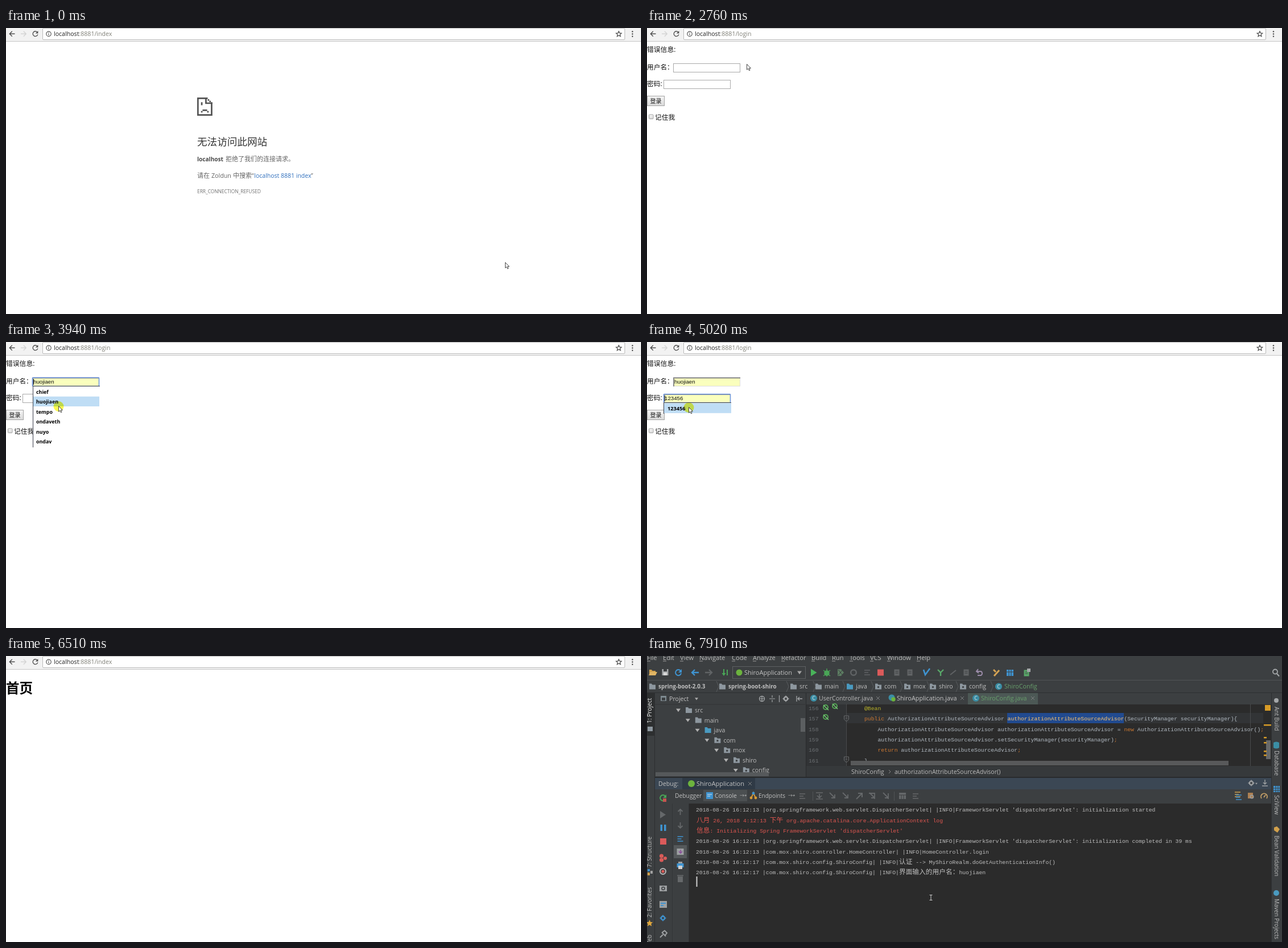
An HTML page for the animation above (7.99 s loop, 1116 by 502 pixels).

```html
<!DOCTYPE html>
<html lang="zh">
<head>
<meta charset="utf-8">
<title>Login demo</title>
<style>
html, body { margin: 0; width: 100%; height: 100%; overflow: hidden; background: #fff; }
svg { display: block; width: 1116px; height: 502px; font-family: "Open Sans", "Noto Sans CJK SC", "Noto Sans CJK", sans-serif; }
text { white-space: pre; }
.mono { font-family: "Liberation Mono", "Noto Sans CJK SC", monospace; }
.field { font-family: "Liberation Sans", sans-serif; }
.line { fill: none; }
#click { mix-blend-mode: multiply; }
</style>
</head>
<body>
<svg id="stage" viewBox="0 0 1116 502"></svg>
<script>
const LOOP = 7990;
const USERS = ['chief', 'huojiaen', 'tempo', 'ondaveth', 'nuyo', 'ondav'];
const CELL = 5.86;

const text = (x, y, s, size, fill, more = '') =>
  `<text x="${x}" y="${y}" font-size="${size}" fill="${fill}" ${more}>${s}</text>`;
const rect = (x, y, w, h, fill, more = '') =>
  `<rect x="${x}" y="${y}" width="${w}" height="${h}" fill="${fill}" ${more}/>`;
const line = (d, stroke, w = 1) =>
  `<path class="line" d="${d}" stroke="${stroke}" stroke-width="${w}"/>`;
const shape = (d, fill) => `<path d="${d}" fill="${fill}"/>`;
const dot = (x, y, r, fill) => `<circle cx="${x}" cy="${y}" r="${r}" fill="${fill}"/>`;
const ring = (x, y, r, stroke, w = 1) =>
  `<circle class="line" cx="${x}" cy="${y}" r="${r}" stroke="${stroke}" stroke-width="${w}"/>`;
const group = (id, body) => `<g id="${id}">${body}</g>`;

// Wide characters take two cells
const mono = (x, y, s, fill) => text(x, y,
  s.replace(/[\u3000-\u9fff\uff00-\uffef]+/g, m => `<tspan font-size="${CELL * 2}">${m}</tspan>`),
  CELL / 0.6, fill, 'class="mono"');

const paint = (s, pattern, fill) => s.replace(pattern, m => `<tspan fill="${fill}">${m}</tspan>`);

function browserBar() {
  const star = Array.from({ length: 10 }, (_, i) => {
    const a = i * Math.PI / 5, r = i % 2 ? 2.3 : 5;
    return `${(1077 + r * Math.sin(a)).toFixed(2)} ${(10.7 - r * Math.cos(a)).toFixed(2)}`;
  }).join('L');
  return rect(0, 0, 1116, 23, '#f2f2f2') + rect(0, 23, 1116, 1, '#c6c6c6') +
    rect(64.5, 0.5, 1023, 20, '#fff', 'rx="1.5" stroke="#b9b9b9"') +
    line('M15.5 10.3H6.5M10.8 5.8L6.3 10.3L10.8 14.8', '#505050', 1.4) +
    line('M26 10.3H35M30.8 5.8L35.3 10.3L30.8 14.8', '#d4d4d4', 1.4) +
    group('reload', line('M54.8 7.2A4.4 4.4 0 1 0 55.8 11.4', '#505050', 1.4) + shape('M56.4 5V9.6H51.8Z', '#505050')) +
    group('stop', line('M47.5 6.5L55.5 14.5M55.5 6.5L47.5 14.5', '#505050', 1.4)) +
    ring(75, 10.4, 4.2, '#555', 1.2) + rect(74.4, 9.7, 1.2, 3, '#555') + rect(74.4, 7.7, 1.2, 1.2, '#555') +
    `<text x="84" y="14" font-size="10.6" fill="#222">localhost<tspan fill="#808078">:8881/<tspan id="path"></tspan></tspan></text>` +
    group('urlCaret', rect(186, 3, 1, 13, '#222')) +
    line(`M${star}Z`, '#4a4a4a', 1.2) +
    [6.2, 10.5, 14.8].map(y => dot(1101, y, 1.2, '#505050')).join('');
}

function errorPage() {
  const gray = '#535353';
  const pixels = [[354.5, 125], [357.3, 127.7], [360, 130.3], [342.7, 145.7], [353.5, 145.7]];
  return line('M354.5 123.4H337.3V152.7H361.4V131M351.4 123V132H362.6', gray, 2.7) +
    pixels.map(([x, y]) => rect(x, y, 2.7, 2.7, gray)).join('') +
    rect(342.7, 130.3, 2.7, 5.2, gray) + rect(345.4, 143, 8.1, 2.7, gray) +
    text(336, 206, '无法访问此网站', 17.6, '#333') +
    text(336, 234, 'localhost', 10.1, '#4a4a4a', 'font-weight="700"') +
    text(386, 234, '拒绝了我们的连接请求。', 11, '#646464') +
    text(336, 263, '请在', 11, '#646464') + text(361, 263, 'Zoldun', 10.7, '#646464') +
    text(399, 263, '中搜索', 11, '#646464') + text(432, 263, '“', 10.5, '#646464') +
    text(436.3, 263, 'localhost 8881 index', 10.5, '#2f6fbd') + text(536, 263, '”', 10.5, '#646464') +
    text(336, 290.3, 'ERR_CONNECTION_REFUSED', 8.35, '#707070');
}

function field(id, x, y) {
  return group(id + 'Plain', rect(x + .5, y + .5, 117, 15, '#fff', 'stroke="#a9a9a9"')) +
    group(id + 'Fill', rect(x, y, 118, 16, '#faffbd') +
      line(`M${x} ${y + 15.5}H${x + 117.5}V${y}`, '#dedede') +
      line(`M${x + 1} ${y + 16}V${y + 1}H${x + 118}`, '#8b8b8b', 2)) +
    group(id + 'Focus', rect(x + .5, y + .5, 117, 15, 'none', 'stroke="#6f97de" stroke-width="1.6" rx="1"') +
      rect(x + 2, y + 3, 1, 10, '#222')) +
    text(x + 2, y + 11, '', 9.7, '#111', `id="${id}Text" class="field"`);
}

function loginPage() {
  const ink = '#111';
  const bold = 'font-weight="700"';
  return text(0, 42, '错误信息:', 11.8, ink) + text(0, 73, '用户名：', 11.7, ink) +
    text(0, 102, '密码:', 11.7, ink) + field('user', 46, 62) + field('pass', 29, 91) +
    rect(.5, 119.5, 30, 17, 'url(#button)', 'stroke="#a3a3a3"') + text(5.5, 132, '登录', 10, ink) +
    rect(3.5, 152, 7.5, 7.5, 'url(#button)', 'stroke="#a3a3a3" rx="1"') + text(14, 160.5, '记住我', 11.7, ink) +
    group('userList', rect(47, 78, 118, 107, '#fff') + rect(48, 0, 116, 17.3, '#bfddf5', 'id="hover"') +
      line('M47.5 185V77.5H165', '#3a3f4c') +
      USERS.map((u, i) => text(53, 90.5 + 17.5 * i, u, 8.9, '#000', bold)).join('')) +
    group('passList', rect(30, 107, 118, 18, '#fff') + rect(30, 107.5, 118, 17.3, '#bfddf5', 'id="passHover"') +
      line('M29.5 126V106.5H148', '#3a3f4c') + text(36, 120, '123456', 9.2, '#000', bold));
}

const folder = (x, y, fill = '#8d979f') => shape(`M${x} ${y - 5}h4l1.5 2h5.5v8h-11z`, fill);
const arrowDown = (x, y, fill = '#a7a7a7', r = 4) => shape(`M${x - r} ${y - r * .6}h${r * 2}l${-r} ${r * 1.4}z`, fill);
const classIcon = (x, y) => dot(x, y, 6, '#3b8ea5') +
  text(x, y + 3.4, 'C', 9, '#e0e6e8', 'text-anchor="middle"');
const close = (x, y) => line(`M${x - 3} ${y - 3}l6 6m0 -6l-6 6`, '#7d7f80');
const gear = (x, y, c) => ring(x, y, 3.3, c, 2.2) + line(`M${x - 5.5} ${y}h11M${x} ${y - 5.5}v11`, c, 1.3) + dot(x, y, 1.7, '#3c3f41');
const rows = (x, y, c) => line(`M${x - 5} ${y - 4}h10m-10 4h7m-7 4h10`, c, 1.7);
const page = (x, y, c) => rect(x - 4.5, y - 5.5, 9, 11, c) + line(`M${x - 2.5} ${y - 2}h5m-5 3h5`, '#3c3f41');
const turn = (x, y, c) => line(`M${x + 4} ${y - 3}a5 5 0 1 0 1 4`, c, 2) + shape(`M${x + 6} ${y - 6}v6h-6z`, c);
const side = (x, y, s, angle, size = 10, fill = '#bdbdbd') =>
  `<text transform="translate(${x} ${y}) rotate(${angle})" font-size="${size}" fill="${fill}">${s}</text>`;

function toolbar() {
  const blue = '#3f94d1', green = '#4aa657', dim = '#606365', grey = '#a4a7a9';
  const menu = [[0, 'File'], [28, 'Edit'], [58, 'View'], [92, 'Navigate'], [149, 'Code'], [186, 'Analyze'], [236, 'Refactor'],
    [289, 'Build'], [325, 'Run'], [356, 'Tools'], [392, 'VCS'], [422, 'Window'], [474, 'Help']];
  const arrow = (x, c, s) => line(`M${x - 6 * s} 29H${x + 5 * s}M${x + s} 24L${x + 6 * s} 29L${x + s} 34`, c, 2.4);
  return menu.map(([x, s]) => text(x, 6.5, s, 11.1, '#bbb') + rect(x, 8.5, 6, 1, '#999')).join('') +
    folder(4, 29, '#d1a04c') + shape('M3 34l3-6h12l-3 6z', '#e0b565') +
    rect(26.5, 23, 11, 11, grey) + rect(29, 23, 6, 4, '#3c3f41') + rect(29, 29, 6, 5, '#d8d8d8') +
    turn(55, 29, blue) + arrow(85, blue, -1) + arrow(108, dim, 1) +
    line('M135 23v9M141 34v-10', green, 2) + shape('M131.5 30h7l-3.5 5z', green) +
    rect(150.5, 18.5, 128, 21, '#3c3f41', 'stroke="#5e6163"') + dot(162, 29, 5.5, '#6cb33e') +
    text(171, 33, 'ShiroApplication', 11, '#c4c4c4') + arrowDown(268, 29) +
    shape('M288 22.5v13l10.5-6.5z', '#49b45a') +
    dot(316, 30, 4.8, green) + line('M310 25l12 10m0-10l-12 10M316 22v14', green, 1.4) +
    shape('M335 23h6l5 6-5 6h-6z', '#5c7d62') + line('M336 24l8 10m0-10l-8 10', '#3c3f41') +
    ring(363, 29, 4.8, dim, 2.5) + rows(387, 29, dim) + rect(405, 23.5, 11, 11, '#db5a5a') +
    page(439, 29, dim) + page(462, 29, dim) + line('M486 24l3 9 8-11', blue, 2.6) +
    line('M511 24l5 5 5-5m-5 5v6', '#59a869', 2.4) + line('M533 33l10-8', dim, 2) + page(561, 29, dim) +
    line('M582 23l-3 4 4 3m-4-3h8a4 4 0 0 1 0 7h-6', '#9a8ba8', 2) +
    line('M610 35l9-10m-10-1l4 4', '#d3a253', 3) + rect(632, 24, 12, 11, blue) + line('M632 28h12m-8-4v11m4-11v11', '#3c3f41') +
    page(667, 30, '#59a869') + rect(668, 22, 6, 6, '#a4a7a9') +
    ring(1104, 27.5, 4, grey, 1.8) + line('M1107 31l4 4.5', grey, 2);
}

function navigation() {
  const crumbs = [[20, 'spring-boot-2.0.3', 1], [143, 'spring-boot-shiro', 1], [268, 'src'], [312, 'main'], [367, 'java'],
    [417, 'com'], [468, 'mox'], [513, 'shiro'], [566, 'config']];
  return rect(0, 42, 1116, 1, '#515456') +
    crumbs.map(([x, s, b], i) => folder(x - 16, 53.5, i == 4 ? '#4a9ac0' : '#8d979f') +
      (i > 4 ? dot(x - 10.5, 54.5, 1.7, '#3c3f41') : '') +
      text(x, 57.3, s, b ? 9.9 : 10.6, '#c0c0c0', b ? 'font-weight="700"' : '')).join('') +
    [122, 245, 292, 344, 394, 445, 492, 543, 604].map(x => line(`M${x} 44l4 9.5-4 9.5`, '#585b5d')).join('') +
    classIcon(618, 53.5) + text(628, 57.3, 'ShiroConfig', 10.7, '#68a06c') + rect(0, 64, 1116, 1, '#2d2f31');
}

function projectTree() {
  const names = ['src', 'main', 'java', 'com', 'mox', 'shiro', 'config'];
  return rect(14, 65, 265, 146, '#3c3f41') + rect(14, 84.5, 264, 1, '#323536') +
    rect(24, 70, 10, 9, '#7f8b91') + rect(26, 73, 6, 5, '#3c3f41') + text(39, 79.3, 'Project', 10.6, '#c4c4c4') + arrowDown(87, 75, '#aaa', 3) +
    ring(202, 75, 4.5, '#a4a7a9', 1.3) + line('M202 71v8m-4-4h8M215 75h10m-5-6v4m0 4v4M232.5 69v12', '#a4a7a9', 1.2) +
    gear(244, 75, '#a4a7a9') + line('M263 70v10m2-5h8m-5-3l-3 3 3 3', '#a4a7a9', 1.3) +
    names.map((s, i) => {
      const y = 95 + 17.55 * i, x = 55 + 16.8 * i;
      return arrowDown(x, y, '#b0b0b0') + folder(x + 13, y, i == 2 ? '#4a9ac0' : '#8d979f') +
        (i > 2 ? dot(x + 18.5, y + 1, 1.7, '#3c3f41') : '') + text(x + 29, y + 4, s, 10.6, '#bcbcbc');
    }).join('') + rect(270, 109, 8, 24, '#5c5f61') + rect(15, 204, 199, 7, '#56595b');
}

function editor() {
  const type = 'AuthorizationAttributeSourceAdvisor', name = 'a' + type.slice(1);
  const code = ['@Bean', `public ${type} ${name}(SecurityManager securityManager){`,
    `    ${type} ${name} = new ${type}();`, `    ${name}.setSecurityManager(securityManager);`, `    return ${name};`, '}'];
  const tint = s => paint(paint(paint(s, /\b(public|new|return)\b|;/g, '#cc7832'),
    /@Bean/, '#bbb529'), RegExp(name + '(?=\\()'), '#ffc66d');
  return rect(279, 65, 1, 147, '#292b2d') + rect(280, 65, 817, 19, '#3c3f41') + rect(564, 65, 123, 20, '#4c5855') +
    classIcon(293, 74) + text(302, 78, 'UserController.java', 10.6, '#bbb') + close(406, 74) +
    dot(430, 73, 5.5, '#3b8ea5') + dot(433, 76, 3.7, '#6cb33e') + text(439, 78, 'ShiroApplication.java', 10.8, '#c8c8c8') + close(554, 74) +
    classIcon(578, 74) + text(587, 78, 'ShiroConfig.java', 10.7, '#68a06c') + close(678, 74) +
    rect(280, 85, 817, 108, '#2b2b2b') + rect(280, 85, 71, 108, '#313335') + rect(351, 100, 732, 18, '#323436') +
    rect(633, 100, 205, 18, '#214a8f') + line('M350.5 84V193M1060.5 84V193', '#494b4d') +
    code.map((s, i) => mono(284, 95 + 18.3 * i, String(156 + i), '#6c7073') + mono(382, 95 + 18.3 * i, tint(s), '#b2bac2')).join('') +
    [[314, 90], [330, 88], [314, 107]].map(([x, y]) => ring(x, y, 4, '#52a552', 2) + line(`M${x - 4} ${y - 4}l9 9`, '#7bc47b', 1.5)).join('') +
    [105, 177].map(y => line(`M346.5 ${y}h8v6l-4 4-4-4zM348.5 ${y + 4}h4`, '#686b6d')).join('') +
    rect(358, 184, 664, 8, '#58595a') + rect(1086, 86, 10, 10, '#d79b27') +
    rect(1088, 148, 8, 33, '#67696a') + [120, 142, 151, 166, 173].map((y, i) => rect(1084, y, i ? 5 : 13, 2.5, '#d79b27')).join('') +
    rect(280, 193, 817, 19, '#36393b') + text(359, 206.7, 'ShiroConfig', 10.7, '#bbb') +
    line('M425 200l3 3-3 3', '#888') + text(435, 206.7, `${name}()`, 10.55, '#bbb');
}

function debugPane() {
  const dim = '#65686a', grey = '#9da0a2', blue = '#3f94d1';
  const log = '2018-08-26 16:12:1', spring = ' |org.springframework.web.servlet.DispatcherServlet| |INFO|FrameworkServlet \'dispatcherServlet\': initialization ';
  const own = s => ` |com.mox.shiro.${s}| |INFO|`;
  const lines = [log + 3 + spring + 'started', '八月 26, 2018 4:12:13 下午 org.apache.catalina.core.ApplicationContext log',
    "信息: Initializing Spring FrameworkServlet 'dispatcherServlet'", log + 3 + spring + 'completed in 39 ms',
    log + 3 + own('controller.HomeController') + 'HomeController.login',
    log + 7 + own('config.ShiroConfig') + '认证 --&gt; MyShiroRealm.doGetAuthenticationInfo()',
    log + 7 + own('config.ShiroConfig') + '界面输入的用户名：' + USERS[1]];
  const step = (x, d) => line(`M${x - 5} 240l9 9m0-6v6h-6${d}`, dim, 1.8);
  return rect(14, 212, 1083, 2, '#292b2d') + rect(14, 214, 1083, 20, '#3c3f41', 'id="header"') + rect(62, 214, 128, 20, '#303335', 'id="headerTab"') +
    text(20, 227.5, 'Debug:', 10.6, '#c0c0c0') + dot(78, 224, 6, '#6cb33e') +
    text(87, 227.5, 'ShiroApplication', 11, '#c4c4c4') + close(181, 224) +
    gear(1062, 223, grey) + arrowDown(1071, 224, grey, 2) + line('M1086 217v8m-3-3l3 3 3-3m-8 6h10', grey, 1.4) +
    rect(14, 234, 1083, 25, '#3c3f41') + rect(99, 235, 77, 20, '#4b4f51') +
    text(49, 249, 'Debugger', 10.3, '#c0c0c0') + rect(104, 239, 12, 12, blue) + line('M106 243h8m-8 3h5', '#e0e0e0') +
    text(119, 249, 'Console', 10.4, '#c4c4c4') + text(163, 248, '→*', 8, '#bbb') +
    line('M183 250l4-10 4 10', '#d89b35', 2) + dot(187, 241, 2.4, blue) + dot(183, 249, 2.4, '#d89b35') + dot(191, 249, 2.4, '#d89b35') +
    text(196, 249, 'Endpoints', 10, '#c0c0c0') + text(248, 248, '→*', 8, '#bbb') +
    rows(273, 246, dim) + line('M291.5 238v16M434.5 238v16', '#505355') + line('M297 240h12m-6 2v6m-4-3l4 4 4-4m-10 6h12', dim, 1.7) +
    step(326, '') + step(349, '') + line('M368 251l9-9m-6-1h7v7', dim, 2) + step(396, 'm-4-8h10v10') + step(420, 'm6-8v10') +
    rect(443, 240, 12, 11, dim) + line('M443 244h12m-8 0v7m4-7v7', '#3c3f41') + rows(472, 246, dim) +
    rows(1038, 243, '#d0a04c') + rows(1040, 248, blue) + rect(1056, 240, 9, 10, '#ad8052') + ring(1063, 247, 2.8, grey, 1.4) +
    line('M1080 250a5.5 5.5 0 1 1 9 0m-5-2l3-4', '#c8a268', 1.8) +
    rect(14, 259, 60, 243, '#3c3f41') + rect(74, 259, 1023, 243, '#2b2b2b') + line('M44.5 259V502M73.5 259V502', '#323537') +
    turn(28, 249, '#4aa657') + rect(28, 250, 6, 6, '#c75450') +
    shape('M23 272v13l10-6.5z', dim) + rect(23.5, 296, 3.5, 11, blue) + rect(30, 296, 3.5, 11, blue) + rect(23, 320, 11, 11, '#db5a5a') +
    dot(25.5, 351, 3.6, '#d95b58') + dot(25.5, 358, 3.6, '#d95b58') + dot(32, 355, 3, '#d95b58') +
    ring(28, 378, 5, '#b9b9b9', 2) + dot(28, 378, 2.6, '#d95b58') +
    rect(22, 403, 13, 10, grey) + ring(28.5, 408, 2.5, '#3c3f41', 1.5) + rect(22, 430, 13, 12, grey) + line('M24 434h9m-9 4h5', blue, 2) +
    gear(28, 460, blue) + line('M23 494l5-5m-2-4l7 7m-6-7l4-3 4 4-3 4', grey, 2) +
    line('M58.5 279v-10m-4 4l4-4 4 4M58.5 292v10m-4-4l4 4 4-4', dim, 1.8) + rows(58.5, 321, blue) +
    rect(47, 332, 23, 23, '#55595b') + rect(52.5, 338, 12, 11, grey) + line('M59 340v6m-3-3l3 3 3-3', '#8b4f9c', 1.6) +
    rect(52.5, 364, 12, 7, blue) + rect(55, 361, 7, 3, grey) + rect(55, 368, 7, 6, '#d0d0d0') +
    rect(54, 387, 9, 10, dim) + rect(53, 384.5, 11, 1.8, dim) +
    lines.map((s, i) => mono(i == 1 || i == 2 ? 87 : 86, 273.3 + 18.35 * i, s, i == 1 || i == 2 ? '#de5650' : '#bdbdbd')).join('') +
    rect(86.5, 387, 2, 18, '#d0d0d0');
}

function sidebars() {
  return rect(0, 65, 13, 437, '#3c3f41') + rect(0, 65, 13, 75, '#2d2f30') + rect(13, 65, 1, 437, '#2d2f31') +
    rect(1097, 65, 19, 437, '#3c3f41') + rect(1097, 65, 1, 437, '#2d2f31') +
    side(8, 118, '1: Project', -90, 10.2, '#eee') + rect(1, 124, 9, 8, '#8d979f') +
    side(8, 371, '7: Structure', -90, 10) + rect(1, 374, 4, 4, '#3f94d1') + rect(1, 380, 4, 5, '#d1a04c') + rect(6, 377, 4, 5, '#a0a0a0') +
    side(8, 459, '2: Favorites', -90, 10) + shape('M4.5 463l1.7 4 4 .3-3 2.8 1 4.2-3.7-2.2-3.7 2.2 1-4.2-3-2.8 4-.3z', '#e2a83c') +
    side(8, 510, 'Web', -90) +
    dot(1106, 78, 4, '#a4a7a9') + side(1103, 89, 'Ant Build', 90, 10) +
    shape('M1101 152q5-3 10 0v9q-5 3-10 0z', '#3b8ea5') + side(1103, 166, 'Database', 90, 10) +
    rect(1101, 228, 11, 11, '#3f94d1') + line('M1101 232h11m-11 4h11m-7-8v11m4-11v11', '#3c3f41') + side(1103, 244, 'SciView', 90, 10) +
    shape('M1102 301l5-2 5 5-4 6-6-4z', '#d1a04c') + side(1103, 315, 'Bean Validation', 90, 9.9) +
    dot(1106, 416, 5, '#4a9ac0') + side(1103, 426, 'Maven Projects', 90, 10);
}

const $ = id => document.getElementById(id);
$('stage').innerHTML = `<defs><linearGradient id="button" x2="0" y2="1"><stop stop-color="#f6f6f6"/><stop offset="1" stop-color="#d9d9d9"/></linearGradient></defs>` +
  rect(0, 0, 1116, 502, '#fff') +
  group('browser', browserBar() + group('error', errorPage()) + group('login', loginPage()) +
    group('home', text(0, 65, '首页', 23.5, '#000', 'font-weight="700"'))) +
  group('ide', rect(0, 0, 1116, 502, '#3c3f41') + toolbar() + navigation() + projectTree() + editor() + debugPane() + sidebars()) +
  '<circle id="click" r="9" fill="#fcf950"/>' +
  group('pointer',
    group('arrow', `<path d="M.5 .5V10.2L2.8 8.2L4.4 11.7L6 11L4.5 7.6H7.4Z" fill="#fff" stroke="#333" stroke-width=".9"/>`) +
    group('beam', `<path id="beamLine" class="line" d="M-2.5 -4.5H2.5M0 -4.5V4.5M-2.5 4.5H2.5" stroke-width="1"/>`));

// Pointer paths: [time, x, y]
const PATHS = [
  [[0, 877, 411], [70, 870, 405], [360, 540, 190], [600, 236, 4], [660, 230, -16]],
  [[2360, 236, 4], [2760, 175, 63], [3070, 129, 64], [3390, 129, 64], [3780, 92, 112], [4010, 92, 112],
    [4450, 74, 97], [4780, 74, 97], [4950, 73, 114], [5090, 73, 114], [5340, 15, 124], [5640, 15, 124],
    [6280, 111, 113], [6350, 215, 235], [6430, 393, 454], [6510, 393, 454]],
  [[7820, 469, 467], [7910, 499, 424], [7990, 499, 424]]
];
const CLICKS = [[3070, 3230], [3940, 4050], [4450, 4530], [5000, 5090], [5490, 5570]];
const BEAMS = [[3040, 3480], [4380, 4860], [7820, 7990]];

const within = (t, a, b) => t >= a && t < b;
const inAny = (t, spans) => spans.some(([a, b]) => within(t, a, b));
const show = (id, on) => $(id).setAttribute('visibility', on ? 'inherit' : 'hidden');

function pointerAt(t) {
  const path = PATHS.find(p => within(t, p[0][0], p[p.length - 1][0]));
  if (!path) return null;
  const i = path.findIndex(k => k[0] > t), [t0, x0, y0] = path[i - 1], [t1, x1, y1] = path[i];
  const k = (t - t0) / (t1 - t0);
  return [Math.round(x0 + (x1 - x0) * k), Math.round(y0 + (y1 - y0) * k)];
}

function setField(id, value, focus) {
  $(id + 'Text').textContent = value;
  show(id + 'Plain', !value);
  show(id + 'Fill', value);
  show(id + 'Focus', focus);
}

function draw(t) {
  const ide = t >= 7430, home = t >= 5900, login = within(t, 2360, 5900);
  show('browser', !ide);
  show('ide', ide);
  show('error', t < 2360);
  show('login', login);
  show('home', home && !ide);
  const loading = within(t, 1750, 2360) || within(t, 5640, 5900);
  show('stop', loading);
  show('reload', !loading);
  $('path').textContent = login ? 'login' : 'index';
  show('urlCaret', within(t, 660, 1120) || within(t, 1670, 1750));

  const row = t < 3500 ? -1 : t < 3640 ? 0 : 1;
  setField('user', USERS[row] || '', within(t, 3070, 4450));
  setField('pass', t < 4860 ? '' : '123456', within(t, 4450, 5490));
  show('userList', login && within(t, 3070, 4050));
  show('hover', row >= 0);
  $('hover').setAttribute('y', 78.2 + 17.5 * row);
  show('passList', login && within(t, 4510, 5090));
  show('passHover', t >= 4860);

  const active = t >= 7520;
  $('header').setAttribute('fill', active ? '#3b4754' : '#3c3f41');
  $('headerTab').setAttribute('fill', active ? '#2f3a46' : '#303335');

  const at = pointerAt(t), beam = inAny(t, BEAMS);
  show('pointer', at);
  show('click', inAny(t, CLICKS));
  if (at) {
    $('pointer').setAttribute('transform', `translate(${at[0]} ${at[1]})`);
    $('click').setAttribute('cx', at[0] + .5);
    $('click').setAttribute('cy', at[1] + 1);
  }
  show('arrow', !beam);
  show('beam', beam);
  $('beamLine').setAttribute('stroke', ide ? '#d0d0d0' : '#222');
}

const start = performance.now();
function tick() {
  draw((performance.now() - start) % LOOP);
  requestAnimationFrame(tick);
}
draw(0);
requestAnimationFrame(tick);
</script>
</body>
</html>
```
